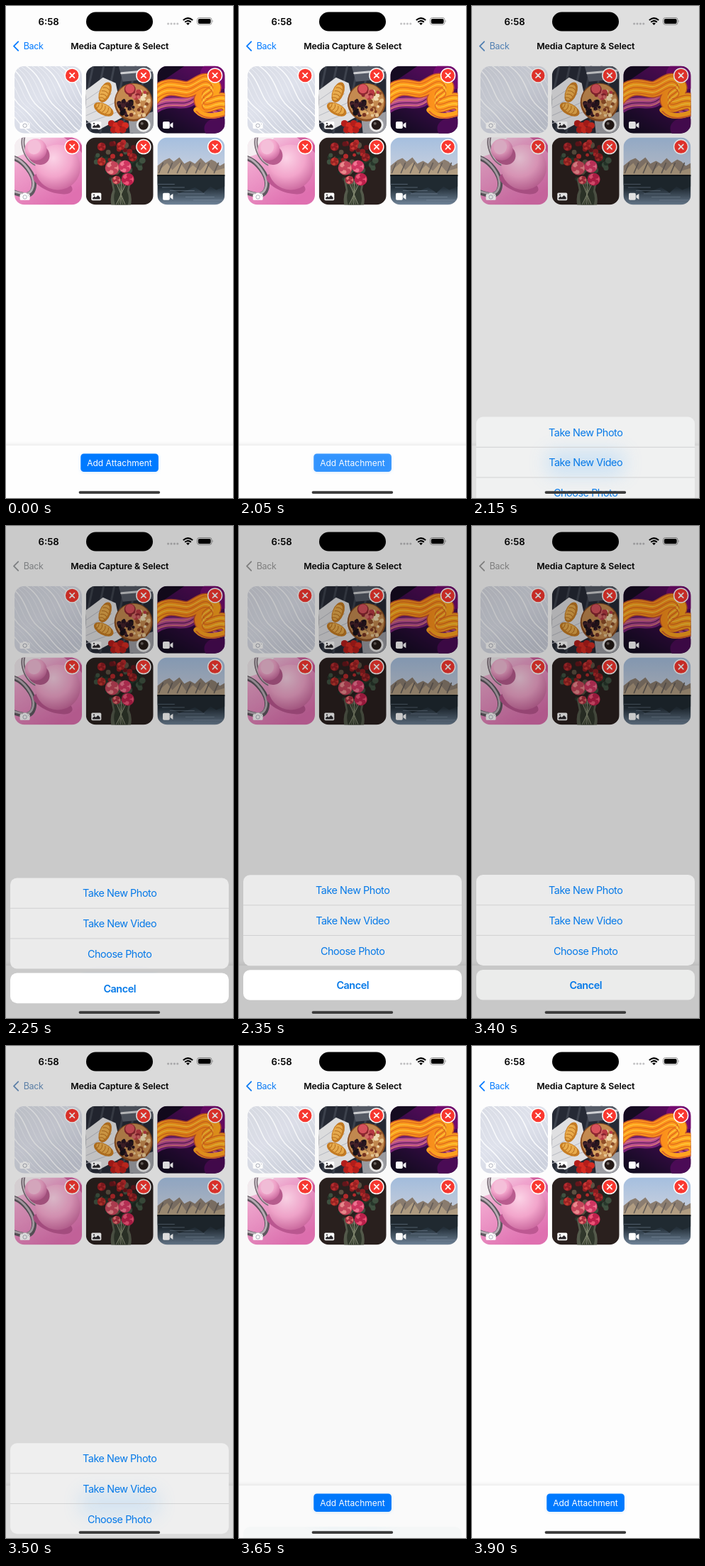
An HTML page for the animation above (5300 ms loop, 320 by 694 pixels).

```html
<!DOCTYPE html>
<html lang="en">
<head>
<meta charset="utf-8">
<title>Media Capture</title>
<style>
  html, body { margin: 0; width: 100%; height: 100%; overflow: hidden; background: #fdfdfd; }
  svg { display: block; width: 100%; height: 100%; }
  text { font-family: Inter, "Liberation Sans", sans-serif; }
  .mid { text-anchor: middle; }
  .bold { font-weight: 600; }
  .option { font-size: 14.4px; fill: #0579e8; letter-spacing: -.45px; }
  .line { fill: none; stroke-linecap: round; stroke-linejoin: round; }
</style>
</head>
<body>
<svg viewBox="0 0 320 694">
  <defs>
    <clipPath id="tile"><rect width="95" height="95" rx="14"/></clipPath>
    <clipPath id="panel"><rect x="6" y="492" width="308" height="128" rx="9.5"/></clipPath>
    <filter id="blur" x="-50%" y="-100%" width="200%" height="300%"><feGaussianBlur stdDeviation="14"/></filter>
    <filter id="soft"><feGaussianBlur stdDeviation="2"/></filter>
    <linearGradient id="silk" x1="0" y1="0" x2=".7" y2="1">
      <stop stop-color="#d9dce5"/><stop offset=".5" stop-color="#dfe2ec"/><stop offset="1" stop-color="#cdd1dd"/>
    </linearGradient>
    <linearGradient id="violet" x1=".8" y1="0" x2=".2" y2="1">
      <stop stop-color="#5c0b5e"/><stop offset=".45" stop-color="#3a0b49"/><stop offset="1" stop-color="#120b20"/>
    </linearGradient>
    <linearGradient id="amber">
      <stop stop-color="#ffa51c"/><stop offset=".55" stop-color="#fb8d1b"/><stop offset="1" stop-color="#ffb01f"/>
    </linearGradient>
    <linearGradient id="rose" x1="0" y1="0" x2=".6" y2="1">
      <stop stop-color="#f6e2ec"/><stop offset=".35" stop-color="#f0a3cd"/><stop offset="1" stop-color="#df70b0"/>
    </linearGradient>
    <radialGradient id="ball" cx=".4" cy=".3" r=".75">
      <stop stop-color="#fbd3e6"/><stop offset=".55" stop-color="#f2a5cb"/><stop offset="1" stop-color="#c9659c"/>
    </radialGradient>
    <linearGradient id="sky" x1="0" y1="0" x2="0" y2="1">
      <stop stop-color="#a5bfdf"/><stop offset="1" stop-color="#eadfdb"/>
    </linearGradient>
    <linearGradient id="lake" x1="0" y1="0" x2="0" y2="1">
      <stop stop-color="#161d22"/><stop offset=".45" stop-color="#26323c"/><stop offset="1" stop-color="#71859a"/>
    </linearGradient>
  </defs>

  <rect width="320" height="694" fill="#fdfdfd"/>

  <text x="45.5" y="26.6" font-size="13.2" class="bold">6:58</text>
  <rect x="113" y="8.5" width="94" height="27" rx="13.5"/>
  <g id="dots" fill="#c2c2c4"></g>
  <g class="line" stroke="#000" stroke-width="2" style="stroke-linecap:butt">
    <path d="M249.8 20.1Q256.5 14.2 263.2 20.1M252.2 22.8Q256.5 19 260.8 22.8"/>
  </g>
  <path d="M254.1 24.6Q256.5 22.5 258.9 24.6L256.5 27Z"/>
  <rect x="269.5" y="16.5" width="20.5" height="9.8" rx="3" fill="none" stroke="#8b8b8b" stroke-width=".9"/>
  <rect x="270.9" y="17.9" width="17.7" height="7" rx="1.9"/>
  <path d="M291 19.8q1.7 1.6 0 3.2z" fill="#999"/>

  <g id="back">
    <path d="M17.2 50.3L11 56.6L17.2 62.9" class="line" stroke="currentColor" stroke-width="1.8"/>
    <text x="24.7" y="61" font-size="12.5" fill="currentColor" letter-spacing="-.35">Back</text>
  </g>
  <text x="160.3" y="60.8" font-size="12.4" class="mid bold" letter-spacing="-.08">Media Capture &amp; Select</text>

  <g id="grid"></g>

  <rect x="-8" y="618" width="336" height="90" fill="#d9d9d9" opacity=".5" filter="url(#soft)"/>
  <rect y="620" width="320" height="74" fill="#fefefe"/>
  <rect x="105" y="632" width="110" height="26" rx="5" fill="#bcdcff" opacity=".6" filter="url(#soft)"/>
  <g id="button">
    <rect x="105.3" y="631.4" width="109.6" height="25.6" rx="4.5" fill="#007aff"/>
    <text x="160" y="648.6" font-size="12" fill="#fff" class="mid">Add Attachment</text>
  </g>

  <rect id="dim" width="320" height="694"/>

  <g id="sheet">
    <rect id="face" x="6" y="492" width="308" height="128" rx="9.5"/>
    <g clip-path="url(#panel)">
      <rect id="glow" x="107" y="630" width="106" height="30" fill="#55b0ff" filter="url(#blur)"/>
    </g>
    <path d="M6 534.7H314M6 577.4H314" stroke="#c9c9cb" stroke-width=".8"/>
    <text x="160.2" y="518.9" class="mid option">Take New Photo</text>
    <text x="160.2" y="561.7" class="mid option">Take New Video</text>
    <text x="160.2" y="604.5" class="mid option">Choose Photo</text>
    <rect id="cancel" x="6" y="626" width="308" height="42.6" rx="9.5"/>
    <text x="160.2" y="653" class="mid option bold">Cancel</text>
  </g>

  <rect x="102.6" y="684.2" width="114.6" height="3.8" rx="1.9" fill="#3b3b3b"/>
</svg>

<script>
const LOOP = 5300, STEP = 50, TRAVEL = 202;
const $ = id => document.getElementById(id);
const list = (n, fn) => Array.from({ length: n }, (_, i) => fn(i)).join('');
const path = (d, color, width) => `<path d="${d}" class="line" stroke="${color}" stroke-width="${width}"/>`;
const shape = (d, fill) => `<path d="${d}" fill="${fill}"/>`;
const dot = (x, y, r, fill) => `<circle cx="${x}" cy="${y}" r="${r}" fill="${fill}"/>`;
const oval = (x, y, rx, ry, fill, turn = 0) =>
  `<ellipse cx="${x}" cy="${y}" rx="${rx}" ry="${ry}" fill="${fill}" transform="rotate(${turn} ${x} ${y})"/>`;
const fill = color => `<rect width="95" height="95" fill="${color}"/>`;

function random(seed) {
  return () => (seed = (seed * 16807) % 2147483647) / 2147483647;
}

function scatter(n, seed, x, y, rx, ry, size, colors) {
  const rnd = random(seed);
  return list(n, i => {
    const a = rnd() * 6.283, d = Math.sqrt(rnd());
    return dot((x + Math.cos(a) * d * rx).toFixed(1), (y + Math.sin(a) * d * ry).toFixed(1),
      (size * (.7 + rnd() * .6)).toFixed(1), colors[i % colors.length]);
  });
}

function silk() {
  return fill('url(#silk)') + list(17, i => {
    const x = i * 8 - 62;
    return path(`M${x} -4C${x + 34} 14 ${x + 28} 42 ${x + 48} 58S${x + 66} 84 ${x + 92} 99`,
      i % 3 ? '#eef0f6' : '#fafbfd', i % 3 ? 1 : 1.5);
  });
}

function picnic() {
  const croissant = (x, y, turn) => `<g transform="translate(${x} ${y}) rotate(${turn})">` +
    oval(0, 0, 15, 8, '#c77d24') + oval(0, -1, 12, 6, '#e9ac4d') +
    list(5, i => path(`M${i * 5 - 10} -5q3 5 0 9`, '#b8701f', 1)) + '</g>';
  return fill('#262a35') +
    list(7, i => path(`M${i * 15 - 5} 0L${i * 15 - 25} 95`, '#3d424d', 3)) +
    shape('M0 34L24 16L42 24L52 72L18 90L0 76Z', '#dfdfe1') +
    list(4, i => path(`M0 ${48 + i * 11}L${32 + i * 4} ${26 + i * 13}`, '#b8bac2', 1)) +
    shape('M46 0H95V18L52 22Z', '#555a66') + path('M50 10L95 6', '#cfd0d3', 3) +
    shape('M60 76L95 64V95H62Z', '#9b9ca2') +
    dot(67, 51, 27, '#8a4d21') + dot(67, 50, 25, '#c48a50') +
    scatter(34, 7, 56, 58, 11, 12, 2.6, ['#2a1620', '#44202a', '#191218']) +
    scatter(20, 15, 80, 48, 9, 14, 2.5, ['#e8c58e', '#8f4d27', '#f0dcb4']) +
    scatter(14, 23, 72, 66, 12, 6, 2.6, ['#d8a462', '#7a3623', '#e7c796']) +
    scatter(14, 31, 72, 38, 12, 7, 3, ['#b83a43', '#d36a68', '#8b2530']) +
    dot(62, 33, 8, '#8d2731') + dot(62, 32, 6.5, '#d8525c') +
    croissant(27, 37, -68) + croissant(25, 61, 28) +
    list(7, i => dot(36 + i % 4 * 6.5 + (i > 3 ? 3 : 0), i > 3 ? 90 : 81 + i % 2 * 3, 4.8, i % 2 ? '#d52c22' : '#b51d1a')) +
    dot(81, 83, 10, '#ececec') + dot(81, 83, 7, '#241a17') + dot(79, 81, 2, '#6a625e');
}

function ribbon() {
  const band = 'M-8 45C14 20 30 34 42 33S66 14 76 26S58 40 64 51S90 38 102 56';
  const under = 'M-8 60C18 40 34 58 50 45S70 70 102 61';
  const lane = (d, dy, c, w) => `<g transform="translate(0 ${dy})">${path(d, c, w)}</g>`;
  return fill('url(#violet)') +
    shape('M0 0H38L0 26Z', '#150b21') + oval(84, 14, 24, 18, '#750b70', 20) + oval(86, 88, 20, 15, '#4b0b56') +
    path(under, '#772076', 19) + path(under, '#b94d8c', 11) +
    list(4, i => lane(under, i * 4 - 6, i % 2 ? '#df7f73' : '#57195d', 1.2)) +
    path(band, '#c44f2b', 24) + path(band, 'url(#amber)', 21) +
    list(5, i => lane(band, i * 4 - 8, i % 2 ? '#ffc83d' : '#e16b1e', 1.3)) +
    path('M55 62C66 74 83 72 102 63', '#ffa31f', 8) + path('M55 64C66 77 83 75 102 67', '#d9622b', 2);
}

function spheres() {
  return fill('url(#rose)') + shape('M0 0H38L15 23L0 28Z', '#f5eff2') +
    path('M66 -8C77 4 88 3 101 25', '#d25d9c', 7) +
    path('M-5 28C12 31 31 54 27 71S7 80 -5 76', '#5f5960', 7) +
    path('M-5 27C12 30 30 54 26 70S7 78 -5 75', '#b9aeb6', 3) +
    path('M14 -4C8 10 16 36 37 40', '#7c6f79', 5) + path('M14 -4C8 10 16 36 37 40', '#d6cdd3', 1.8) +
    oval(54, 65, 29, 12, '#bd5892', 20) + dot(61, 42, 32, 'url(#ball)') +
    oval(34, 24, 16, 14, '#b95d8f', 30) + dot(30, 17, 15.5, 'url(#ball)') + oval(28, 14, 9, 10, '#f4bfd9', 30);
}

function bouquet() {
  const bloom = (x, y, r, a, b) => dot(x, y, r, a) +
    list(6, i => oval((x + Math.cos(i * 1.05) * r * .55).toFixed(1), (y + Math.sin(i * 1.05) * r * .55).toFixed(1), r * .5, r * .34, i % 2 ? a : b, i * 60 + 90)) +
    dot(x, y, r * .32, a);
  return fill('#2a201e') +
    scatter(38, 11, 46, 36, 34, 27, 3.8, ['#27372b', '#3f5140', '#1d2a22', '#5d5142']) +
    shape('M35 59H64L61 74Q66 84 63 97H36Q33 84 38 74Z', '#545a4b') +
    shape('M39 66H60L58 76Q62 84 59 95H41Q38 84 41 76Z', '#30372b') +
    list(5, i => path(`M${42 + i * 4} 62L${55 - i * 3} 94`, i % 2 ? '#6c7659' : '#8e927d', 1)) +
    scatter(12, 41, 44, 20, 28, 15, 3, ['#8d1d20', '#b52a2b', '#65161b']) +
    bloom(22, 13, 6, '#8e1c22', '#b92f30') + bloom(49, 12, 6, '#9e2023', '#cd3a35') +
    bloom(66, 28, 6, '#821b20', '#b22d2c') + bloom(22, 34, 6, '#9c2423', '#c43d32') +
    bloom(37, 43, 10, '#c5455a', '#e9898c') + bloom(55, 41, 9, '#d03661', '#f07692') +
    bloom(59, 59, 9, '#bd204b', '#ec5477') + bloom(43, 60, 6, '#ab3041', '#e87a78');
}

function mountains() {
  const ridge = 'M0 40L10 32L17 29L23 34L31 28L38 37L46 33L53 37L61 29L68 36L76 31L82 34L88 40L95 36V55H0Z';
  return fill('url(#sky)') + shape(ridge, '#8b7d70') +
    shape('M0 48L14 36L21 46L32 35L41 48L50 39L60 47L69 37L79 48L95 43V55H0Z', '#b19d82') +
    list(7, i => path(`M${8 + i * 13} 36L${2 + i * 13} 50`, '#655e59', 1.6)) +
    `<rect y="53" width="95" height="42" fill="url(#lake)"/>` +
    shape('M0 54H95V69L83 74L75 69L65 78L53 70L44 74L31 78L19 72L0 67Z', '#202a31') +
    list(6, i => path(`M${i * 11 - 4} ${66 + i * 4.5}h${28 + i * 3}`, '#8497a8', .5)) +
    path('M0 53.6H95', '#11181c', 1.8);
}

const icons = {
  camera: '<path d="M1.6 2H4L5 .4H9L10 2H12.4Q14 2 14 3.6V9Q14 10.6 12.4 10.6H1.6Q0 10.6 0 9V3.6Q0 2 1.6 2Z" fill="#fff"/>' +
    '<circle cx="7" cy="6.2" r="2.7" fill="none" stroke="#a9adb8" stroke-width="1"/><circle cx="11.8" cy="4" r=".6" fill="#a9adb8"/>',
  image: '<rect y=".4" width="14" height="10.6" rx="1.6" fill="#fff"/>' +
    '<path d="M1.8 9.2V7.6L4.4 5.1L6.2 6.8L9.4 3.7L12.3 6.7V9.2Z" fill="#29262a"/><circle cx="3.7" cy="3.3" r="1.1" fill="#29262a"/>',
  video: '<rect y=".6" width="9.8" height="10" rx="1.8" fill="#fff"/><path d="M10.4 4.2L14.4 1.5V9.7L10.4 7Z" fill="#fff"/>'
};

const tiles = [
  [silk, 'camera'], [picnic, 'image'], [ribbon, 'video'],
  [spheres, 'camera'], [bouquet, 'image'], [mountains, 'video']
];

$('grid').innerHTML = tiles.map(([draw, icon], i) => `
  <g transform="translate(${12 + i % 3 * 100.7} ${84.7 + Math.floor(i / 3) * 100.7})">
    <g clip-path="url(#tile)">${draw()}</g>
    <g transform="translate(7.6 77.8)">${icons[icon]}</g>
    <circle cx="81.2" cy="13.2" r="10" fill="#fa3830" stroke="#fff" stroke-width="1.5"/>
    <path d="M78 10l6.4 6.4m0-6.4l-6.4 6.4" class="line" stroke="#fff" stroke-width="1.7"/>
  </g>`).join('');
$('dots').innerHTML = list(4, i => `<circle cx="${228.6 + i * 4.4}" cy="25" r="1.55"/>`);

// Critically damped spring from 0 to 1
const spring = (t, rate) => t <= 0 ? 0 : 1 - (1 + rate * t) * Math.exp(-rate * t);
const mix = (a, b, k) => a + (b - a) * k;
const rgb = (a, b, k) => `rgb(${a.map((v, i) => Math.round(mix(v, b[i], k)))})`;

function render(t) {
  const open = t < 3400 ? (t < 2150 ? 0 : spring(t - 2100, .038))
    : t >= 3900 ? 0 : 1 - spring(t - 3440, .02);
  const drop = (1 - open) * TRAVEL;
  $('button').setAttribute('opacity', t >= 2050 && t < 2250 ? .76 : 1);
  $('back').style.color = rgb([0, 122, 255], [160, 160, 160], open);
  $('dim').setAttribute('opacity', .21 * open);
  $('sheet').setAttribute('transform', `translate(0 ${drop})`);
  $('sheet').setAttribute('visibility', open > 0 ? 'visible' : 'hidden');
  $('face').setAttribute('fill', rgb([246, 248, 248], [235, 235, 235], open));
  $('glow').setAttribute('y', 630 - drop);
  $('glow').setAttribute('opacity', Math.min(.4, (1 - open) * .6));
  $('cancel').setAttribute('fill', t >= 3400 ? '#ebeceb' : '#fff');
}

const start = performance.now();
function tick() {
  const t = (performance.now() - start) % LOOP;
  render(Math.floor(t / STEP) * STEP);
  requestAnimationFrame(tick);
}
tick();
</script>
</body>
</html>
```
